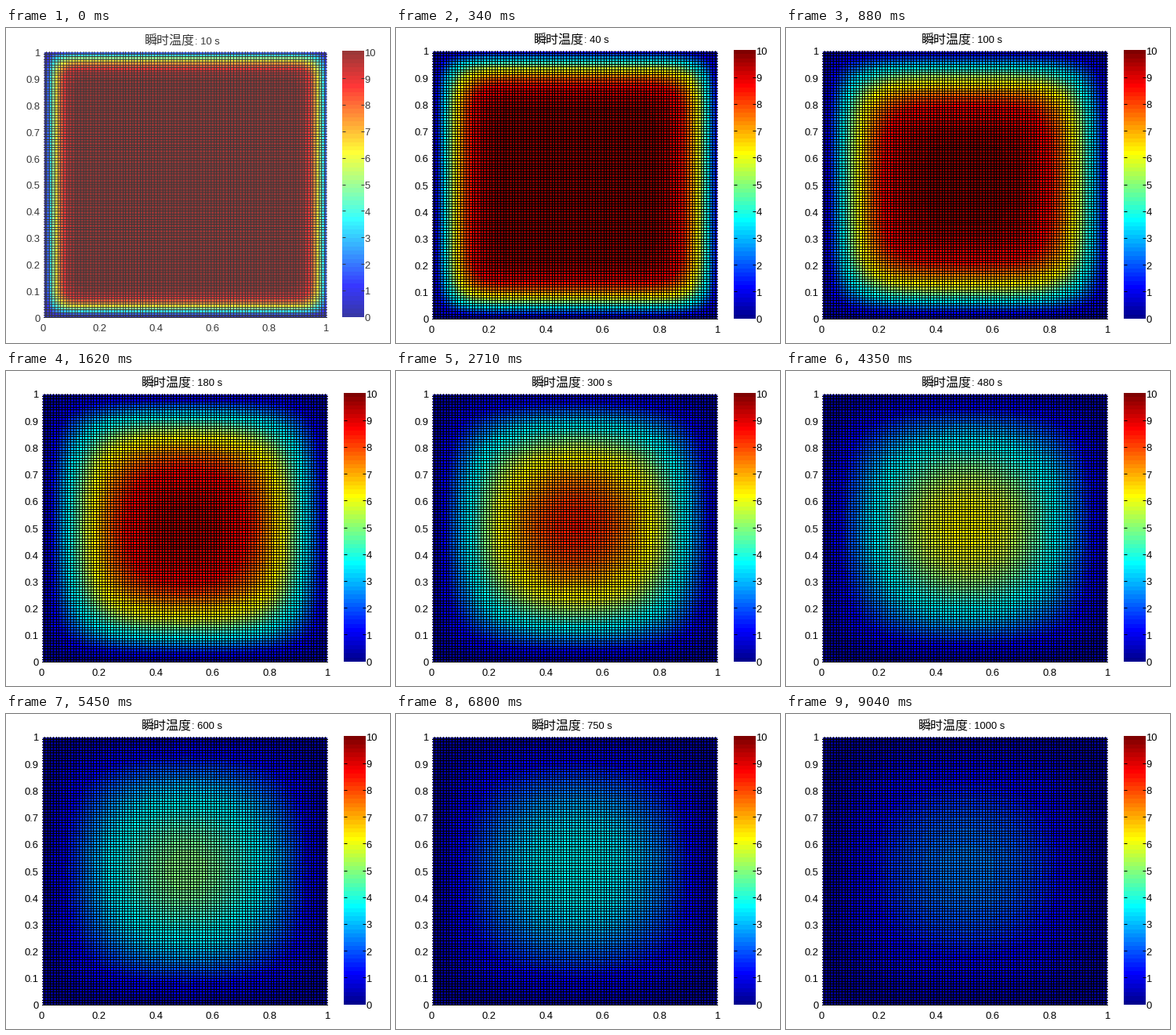
Animation of 490x402 px, one loop 9380 ms. Source, as a matplotlib script:

```python
import numpy as np
import matplotlib.pyplot as plt
from matplotlib.animation import FuncAnimation
from matplotlib.patches import Rectangle

W, H, DPI = 490, 402, 64
LOOP, STEP = 9380, 20
PX = 72 / DPI                           # points per pixel
LEFT, RIGHT, TOP, BOTTOM = 46, 411, 29, 372
BAR_L, BAR_R, BAR_T, BAR_B = 431, 459, 28, 371
CELLS, ALPHA, T0 = 100, 9.9e-5, 10.0

# Runs of evenly spaced steps: first ms, last ms, count
RUNS = [(70, 880, 10), (1010, 1890, 11), (1970, 2780, 10), (2910, 3590, 9),
        (3740, 4620, 11), (4690, 5300, 8), (5450, 6330, 11),
        (6400, 7270, 10), (7340, 8230, 11), (8300, 9040, 9)]
STARTS = np.concatenate([np.linspace(*run) for run in RUNS])


def jet64():
    i = np.arange(64)[:, None]
    return np.clip((24 - np.abs(i - np.array([47, 31, 15]))) / 16, 0, 1)


JET = jet64()
MODES = np.arange(1, 120, 2)
NODES = np.arange(CELLS) / CELLS
SINES = np.sin(np.pi * np.outer(NODES, MODES)) * 4 / (np.pi * MODES)


def heat(seconds):
    """Square plate at T0 with cold edges, cooled for some seconds."""
    s = SINES @ np.exp(-(MODES * np.pi) ** 2 * ALPHA * seconds)
    return T0 * np.outer(s, s)


def grid(size):
    """Cell index of each pixel, and which pixels carry a grid line."""
    edges = np.arange(CELLS + 1) * size // CELLS
    pix = np.arange(size)
    return np.searchsorted(edges, pix, "right") - 1, np.isin(pix, edges)


COL, COL_LINE = grid(RIGHT - LEFT)
ROW, ROW_LINE = (a[::-1] for a in grid(BOTTOM - TOP))
COL_LINE[0] = False
LINES = ROW_LINE[:, None] | COL_LINE[None, :]


def mesh(seconds):
    level = np.clip(heat(seconds) / T0 * 64, 0, 63).astype(int)
    rgb = JET[level[np.ix_(ROW, COL)]]
    rgb[:, [0, -1]] = 1                 # only line ends reach the rim
    rgb[0] = 1
    rgb[LINES] = 0
    return rgb


fig = plt.figure(figsize=(W / DPI, H / DPI), dpi=DPI, facecolor="white")
ax = fig.add_axes([0, 0, 1, 1])
ax.axis("off")


def label(x, y, s, ha="left", size=13, font="Liberation Sans"):
    return ax.text(x, y, s, ha=ha, va="baseline", fontsize=size * PX,
                   family=font, color="black")


def picture(rgb, *extent):
    return ax.imshow(rgb, extent=extent, interpolation="nearest", aspect="auto")


plate = picture(mesh(10), LEFT, RIGHT, BOTTOM, TOP)
picture(JET[::-1, None], BAR_L, BAR_R, BAR_B, BAR_T)

for k in range(11):
    y = BOTTOM - 0.5 - k / 10 * (BOTTOM - TOP - 1)
    label(41.5, y + 5, f"{k / 10:g}", "right")
    y = BAR_B - 0.5 - k / 10 * (BAR_B - BAR_T - 1)
    label(459.5, y + 5.5, str(k))
    if 0 < k < 10:
        for x in (BAR_L, BAR_R - 4):
            ax.plot([x, x + 4], [y, y], color="black", lw=PX,
                    solid_capstyle="butt")
    if k % 2 == 0:
        x = LEFT - 0.5 + k / 10 * (RIGHT - LEFT - 1)
        label(x, 389, f"{k / 10:g}", "center")

name = label(0, 20, "瞬时温度", size=16, font="Noto Sans CJK JP")
clock = label(0, 19, "")
veil = ax.add_patch(Rectangle((-20, -20), W + 40, H + 40, fc="white",
                              ec="none", alpha=0.22, zorder=10))


def zoom(z):
    ax.set_xlim(W / 2 - W / 2 / z, W / 2 + W / 2 / z)
    ax.set_ylim(H / 2 + H / 2 / z, H / 2 - H / 2 / z)


def update(n):
    step = int(np.searchsorted(STARTS, (n + 1) * STEP, "right"))
    intro = step == 0
    seconds = 10 * max(step, 1)
    zoom(0.99 if intro else 1)
    veil.set_visible(intro)
    plate.set_interpolation("bilinear" if intro else "nearest")
    plate.set_data(mesh(seconds))
    x = 176 - 3.6 * (len(str(seconds)) - 2)
    name.set_x(x)
    clock.set_x(x + 64.5)
    clock.set_text(f": {seconds} s")
    return plate, name, clock, veil


anim = FuncAnimation(fig, update, frames=LOOP // STEP, interval=STEP,
                     repeat=True, repeat_delay=0, blit=False)
plt.show()
```
